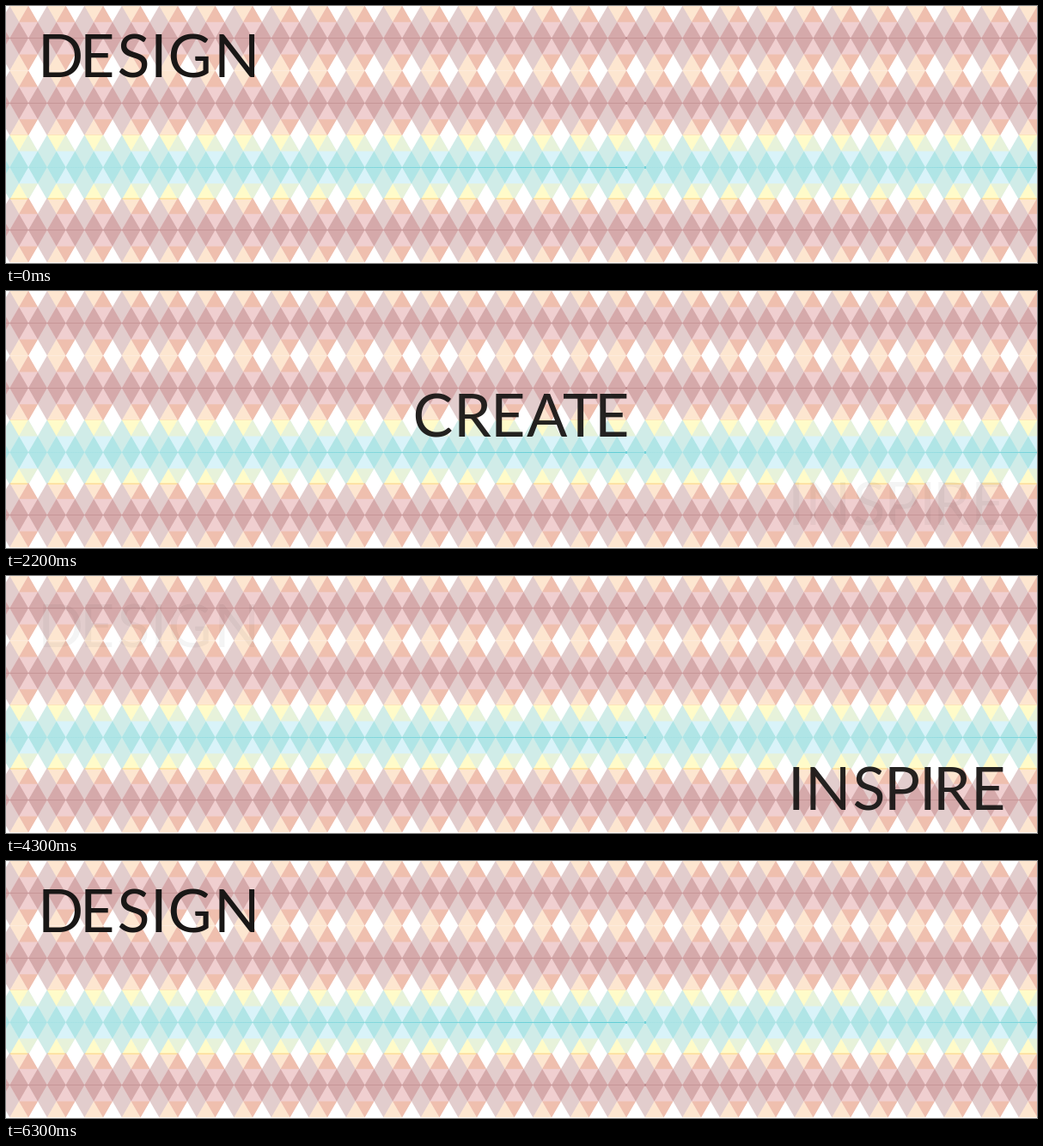
Animation, 1200 px wide and 300 px high, one loop 6400 ms. Source, as an HTML page with a canvas:

```html
<!DOCTYPE html>
<html lang="en">
<head>
<meta charset="utf-8">
<title>Design, create, inspire</title>
<style>
html, body { margin: 0; width: 100%; height: 100%; overflow: hidden; background: #fff; }
canvas { display: block; width: 1200px; height: 300px; }
</style>
</head>
<body>
<canvas id="stage" width="1200" height="300"></canvas>
<script>
const W = 1200, H = 300;
const LOOP = 6400, TICK = 100, FADE_TICKS = 21;
const STEP = 21.75, HALF = STEP / 2, RISE = 37.7, LEFT = 4.3;

const rose = { main: '#e2cdcd', alt: '#f0cfd0', edge: '#efbfae', side: '#fde6d0', mix: '#d5a9aa', line: '#b98488' };
const aqua = { main: '#d0ece8', alt: '#d9f3f9', edge: '#e7f2da', side: '#fffbc9', mix: '#b0e5e6', line: '#5bcbd4' };
const rows = [[37.6, rose], [113.3, rose], [188.3, aqua], [261.6, rose]];

// Each word: baseline, then the centre of every letter
const words = [
  { text: 'DESIGN', base: 83, at: [65, 108, 148, 178, 214, 269] },
  { text: 'CREATE', base: 170, at: [498, 546, 586, 630, 669, 707] },
  { text: 'INSPIRE', base: 273, at: [920, 957, 1004, 1045, 1073, 1104, 1145] }
];

const ctx = document.getElementById('stage').getContext('2d');
const backdrop = document.createElement('canvas');
backdrop.width = W;
backdrop.height = H;
const bg = backdrop.getContext('2d');

function poly(color, ...pts) {
  bg.fillStyle = color;
  bg.beginPath();
  for (const [x, y] of pts) bg.lineTo(x, y);
  bg.fill();
}

function diamond(color, x, y, rx, ry) {
  poly(color, [x - rx, y], [x, y - ry], [x + rx, y], [x, y + ry]);
}

function drawCell(x, y, c) {
  const alt = x + STEP;
  diamond(c.main, x, y, STEP, RISE);
  diamond(c.alt, alt, y, STEP, RISE);
  for (const dir of [-1, 1]) {
    const inner = y + dir * RISE / 2, outer = y + dir * RISE;
    bg.globalCompositeOperation = 'multiply';
    poly(c.side, [x + HALF, inner], [alt, outer], [x, outer]);
    bg.globalCompositeOperation = 'source-over';
    poly(c.edge, [alt - HALF, inner], [alt + HALF, inner], [alt, outer]);
  }
}

function drawSeam(y, c) {
  const top = Math.floor(y);
  if (c === aqua) {
    const g = bg.createLinearGradient(0, 0, W, 0);
    const stops = [[0, 0.1], [0.1, 0.1], [0.6, 0.95], [0.603, 0.4], [0.62, 0.4], [0.622, 0.1], [0.85, 0.1], [1, 0.7]];
    for (const [p, a] of stops) g.addColorStop(p, `rgba(91,203,212,${a})`);
    bg.fillStyle = g;
  } else {
    bg.globalAlpha = 0.5;
    bg.fillStyle = c.line;
  }
  bg.fillRect(0, top, W, 1);
  bg.globalAlpha = 0.7;
  bg.fillStyle = c.line;
  for (const x of [721, 743]) bg.fillRect(x, top - 1, 2, 3);
  bg.globalAlpha = 1;
}

function drawBackdrop() {
  bg.fillStyle = '#fff';
  bg.fillRect(0, 0, W, H);
  for (const [y, c] of rows) {
    for (let x = LEFT - 2 * STEP; x < W + STEP; x += 2 * STEP) drawCell(x, y, c);
    for (let x = LEFT - HALF; x < W + STEP; x += STEP) diamond(c.mix, x, y, HALF, RISE / 2);
    drawSeam(y, c);
  }
}

function drawWord(word, alpha) {
  if (alpha <= 0) return;
  ctx.globalAlpha = alpha;
  ctx.fillStyle = '#191716';
  [...word.text].forEach((ch, i) => {
    const m = ctx.measureText(ch);
    const mid = (m.actualBoundingBoxRight - m.actualBoundingBoxLeft) / 2;
    ctx.fillText(ch, word.at[i] - mid, word.base);
  });
  ctx.globalAlpha = 1;
}

function frame() {
  const tick = Math.floor((performance.now() % LOOP) / TICK);
  const index = Math.floor(tick / FADE_TICKS);
  const mix = (tick % FADE_TICKS) / FADE_TICKS;
  ctx.drawImage(backdrop, 0, 0);
  ctx.font = '70px Lato, sans-serif';
  drawWord(words[index % 3], 1 - mix);
  drawWord(words[(index + 1) % 3], mix);
  requestAnimationFrame(frame);
}

drawBackdrop();
frame();
</script>
</body>
</html>
```
